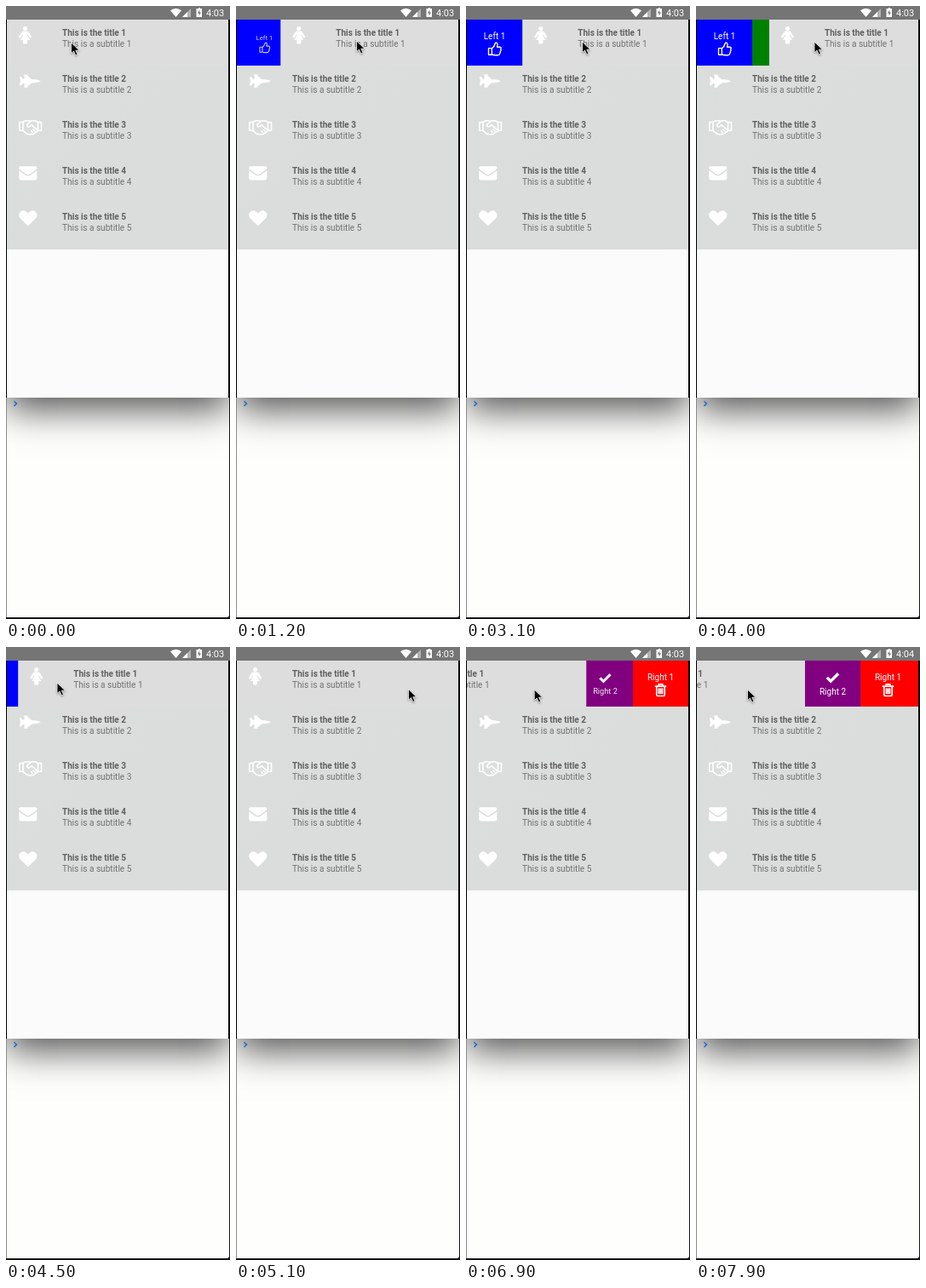
Recreate the animation shown at these times as an HTML page. Size 263 px wide and 720 px high, loop 8000 ms.

```html
<!DOCTYPE html>
<html lang="en">
<head>
<meta charset="utf-8">
<title>Swipe row</title>
<style>
  html, body { margin: 0; width: 100%; height: 100%; overflow: hidden; background: #fefefd; }
  .shadow { position: absolute; left: 0; top: 0; width: 262px; height: 460px; box-shadow: 0 14px 40px rgba(0,0,0,.67); }
  svg { position: absolute; left: 0; top: 0; }
  text { font: 10px Roboto, Arial, sans-serif; }
  .title { font-weight: 700; fill: #606060; }
  .sub { font-size: 10.1px; fill: #727272; }
  .label { fill: #fff; text-anchor: middle; }
  .line { fill: none; stroke: #fff; stroke-linejoin: round; stroke-linecap: round; }
</style>
</head>
<body>
<div class="shadow"></div>
<svg width="263" height="720" viewBox="0 0 263 720">
  <defs>
    <linearGradient id="list" x1="0" y1="0" x2="1" y2="1">
      <stop offset="0" stop-color="#dcdddd"/><stop offset="1" stop-color="#dadddb"/>
    </linearGradient>
    <clipPath id="screen"><rect y="16" width="261" height="444"/></clipPath>
  </defs>
  <rect width="263" height="460" fill="#fbfbfb"/>
  <g clip-path="url(#screen)">
    <rect x="1" y="70" width="260" height="216" fill="url(#list)"/>
    <g id="rows"></g>
    <!-- actions, each centred on its own tile -->
    <rect x="66" y="16" width="65" height="54" fill="#008000"/>
    <g id="left2">
      <path fill="#fff" d="M-8-14h1.6v15h-1.6zM-5.6-13q3-2 6-.4t7.4-.4v8.6q-4 2-7 .4t-6.4.6z"/>
      <text class="label" y="12.5">Left 2</text>
    </g>
    <rect x="1" y="16" width="65" height="54" fill="#00f"/>
    <g id="left1">
      <text class="label" y="-4">Left 1</text>
      <path class="line" stroke-width="1.4" d="M-7 6.6h3.8v7.6H-7zM-3.2 7Q0 4.300.6 1.500.8-.2 2.200.1 4.300.8 3 5.200H6.500Q8.400 5.600 7.200 7.800 8.300 9 6.900 10.300 7.500 11.700 6 12.600 6.200 14.600 4 14.700H1Q-1.500 14.600-3.200 13.800"/>
    </g>
    <rect id="purple" y="16" width="65" height="54" fill="#800080"/>
    <rect id="red" y="16" width="80" height="54" fill="#f00"/>
    <g id="right2">
      <path fill="none" stroke="#fff" stroke-width="3.4" d="M-6.700-7.100l4.400 4.300 8.900-8.900"/>
      <text class="label" y="13">Right 2</text>
    </g>
    <g id="right1">
      <text class="label" y="-4">Right 1</text>
      <path class="line" stroke-width="1.700" d="M-6 3.200H6M-2.400 3V.800H2.400V3M-4.700 3.400V13q0 1.500 1.300 1.500H3.400q1.300 0 1.300-1.500V3.400M-2 6v5.500M0 6v5.500M2 6v5.500"/>
    </g>
    <g id="row"><rect x="1" y="16" width="260" height="54" fill="#dddddd"/></g>
  </g>

  <!-- status bar -->
  <rect width="263" height="16" fill="#757575"/>
  <g fill="#fff">
    <path d="M193 5.300Q199.500 0 206 5.300L199.500 13z"/>
    <path d="M217 3v10h-10z" opacity=".45"/><path d="M213 7v6h-6z"/>
    <path d="M225 3h1v-1h2v1h2v10h-6.500V3z"/>
    <path d="M227.300 4.500l-2.400 4h1.700V11.500l2.400-4h-1.700z" fill="#757575"/>
    <text id="clock" x="235" y="12" style="font-size:11px">4:03</text>
  </g>

  <!-- frame edges -->
  <path d="M0 16h1v444H0zM261 16h2v444h-2z"/>
  <path d="M0 460h1v258H0z" fill="#8c8c8c"/>
  <path d="M262 460h1v260H0v-2h259q3 0 3-3z" fill="#151515"/>
  <path d="M9.500 464.300l3 2.800-3 2.800" fill="none" stroke="#1f6fd0" stroke-width="1.500"/>

  <path id="cursor" d="M0 0v12.700l3-2.700 2.300 5 2.200-1-2.200-4.800h4.200z" stroke="#fff" stroke-width=".8"
    style="filter:drop-shadow(0 1px 1px rgba(0,0,0,.4))"/>
</svg>
<script>
const $ = id => document.getElementById(id);
const icons = [
  // woman
  '<circle cx="22.500" cy="26.500" r="2.500"/><path d="M20.300 29.600h4.400q1.200 0 2 1.200l3 4.700q.6 1.200-.3 1.800t-1.800-.4l-2.500-3.800v1.600l3 5.200h-3v3.300q0 1.200-1.100 1.200h-3q-1.100 0-1.100-1.200v-3.300h-3l3-5.200v-1.600l-2.500 3.800q-.9 1-1.800.4t-.3-1.800l3-4.700q.8-1.200 2-1.200z"/>',
  // jet
  '<path d="M41 34.200q-2.500 1.700-7 2h-3.500l-6 5h1.200v.6h-5v-.6h.9v-4.500h-1.600l-2.300 2.800h-1.500v-3.200h.6v-4.200h-.6v-3.200h1.500l2.300 2.800h1.600v-4.500h-.9v-.6h5v.6h-1.200l6 5h3.500q4.500.3 7 2z"/>',
  // handshake
  '<g class="line" stroke-width="1.600"><path d="M15.800 28.500h4l3.200-1.700h4l1.700.9 1.600-.9h4l3.200 1.700h4v9.800h-3.600l-5.300 3.700q-1.600 1.300-3 .4-1.600 1-2.900 0-1.700.5-2.900-.8l-4-3.300h-4zM20 28.500v9.800M37.500 28.500v9.800"/><path d="M28.700 27.700l-4.200 4q.5 2.700 3.200 1.900l2.400-2 6 5.500M32 37l2 2M29.500 38.500l1.700 2"/></g>',
  // envelope
  '<path d="M17 26.300h17.500q1.800 0 1.800 1.900-.2 1.300-1.500 2.300l-7 4.900q-2 1.300-4 0l-7-4.900q-1.300-1-1.500-2.300 0-1.900 1.700-1.900z"/><path d="M15.300 31.300l7.300 5.200q3.200 2 6.400 0l7.300-5.200v9.300q0 1.800-1.800 1.800H17q-1.700 0-1.700-1.800z"/>',
  // heart
  '<path d="M25.800 42.300L17 33.800Q14 30 16 26.700q3.300-4 7.500-1.300l2.300 2.100 2.300-2.100q4.200-2.700 7.500 1.300 2 3.300-1 7.100z"/>'
];
const rowContent = n => `<g fill="#fff">${icons[n - 1]}</g>
  <text class="title" x="66" y="34.500">This is the title ${n}</text>
  <text class="sub" x="66" y="48">This is a subtitle ${n}</text>`;
$('row').insertAdjacentHTML('beforeend', rowContent(1));
for (let n = 2; n <= 5; n++)
  $('rows').insertAdjacentHTML('beforeend', `<g transform="translate(0 ${54 * (n - 1)})">${rowContent(n)}</g>`);

// [time, value...]
const swipe = [[300, 0], [1200, 51.3], [2100, 101.500], [2200, 109.300], [2500, 122], [3000, 65.500], [3200, 65],
  [3600, 122], [3900, 98], [4000, 85], [4100, 66], [4600, 0], [5400, 0], [6200, -80.500],
  [7100, -131], [7400, -131], [7700, -133]];
const pointer = [[0, 76.500, 43], [100, 71, 39], [300, 70, 38], [1200, 141.500, 41], [2200, 190, 42], [2500, 198, 42],
  [3000, 137, 42], [3200, 136, 42], [3600, 196, 42], [4000, 139, 42], [4100, 120, 42], [4500, 60, 42],
  [5000, 246, 44], [5100, 202.500, 49.500], [5400, 200, 50], [6200, 119.500, 50], [7100, 69, 50],
  [7800, 68, 50], [7900, 60.500, 50]];

function sample(keys, t) {
  const i = keys.findIndex(k => k[0] > t);
  if (i === 0) return keys[0].slice(1);
  if (i < 0) return keys[keys.length - 1].slice(1);
  const a = keys[i - 1], b = keys[i], p = (t - a[0]) / (b[0] - a[0]);
  return a.slice(1).map((v, j) => v + (b[j + 1] - v) * p);
}
const move = (id, x, y = 0, extra = '') => $(id).setAttribute('transform', `translate(${x} ${y}) ${extra}`);

function action(id, x, progress) {
  const p = Math.max(0, Math.min(1, progress));
  move(id, x, 43, `scale(${p})`);
  $(id).setAttribute('opacity', p);
}

function draw(now) {
  const t = Math.floor(now % 8000 / 100) * 100;
  const [x] = sample(swipe, t);
  const over = Math.min(0, x + 130);
  move('row', x);
  action('left1', 33.500, x / 65);
  action('left2', 98.500, x / 130);
  move('red', 196 + over);
  move('purple', 131 + over);
  action('right1', 228.500 + over, -x / 65);
  action('right2', 163.500 + over, -x / 130);
  move('cursor', ...sample(pointer, t));
  $('clock').textContent = t < 7600 ? '4:03' : '4:04';
}

const start = performance.now();
(function tick() {
  draw(performance.now() - start);
  requestAnimationFrame(tick);
})();
</script>
</body>
</html>
```
